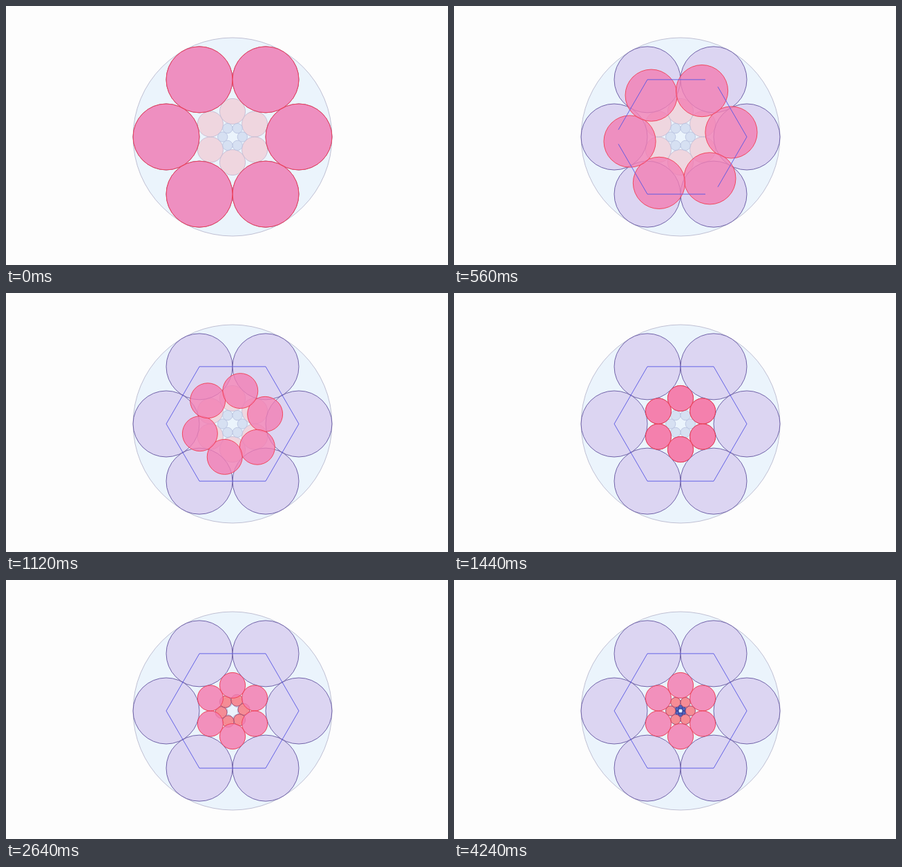
These frames come from a looping animation (640 px wide and 376 px high, 4800 ms). An HTML page with a canvas:

```html
<!DOCTYPE html>
<html lang="en">
<head>
<meta charset="utf-8">
<title>Nested rings of circles</title>
<style>
html, body { margin: 0; height: 100%; overflow: hidden; background: #fdfdfd; }
canvas { display: block; }
</style>
</head>
<body>
<canvas id="stage" width="640" height="376"></canvas>
<script>
const ctx = document.getElementById('stage').getContext('2d');
const STEP = 80, LOOP = 4800, LAST = 53, PHASE = 17;
const CX = 328, CY = 190, DIST = 96;
// Each ring touches the one around it, turned by 30 degrees.
const SHRINK = (Math.sqrt(3) + 0.5 - Math.sqrt(1 + Math.sqrt(3))) / 1.5;

const clamp = v => Math.max(0, Math.min(1, v));
const lerp = (a, b, s) => a + (b - a) * s;

function point(level, i) {
  const angle = (i * 60 - (level % 2) * 30) * Math.PI / 180;
  const d = DIST * SHRINK ** level;
  return { x: CX + d * Math.cos(angle), y: CY + d * Math.sin(angle), r: d / 2 };
}

function circle(x, y, r, fill, stroke) {
  ctx.beginPath();
  ctx.arc(x, y, r, 0, 2 * Math.PI);
  ctx.fillStyle = fill;
  ctx.fill();
  ctx.strokeStyle = stroke;
  ctx.stroke();
}

// Six circles on straight paths from one level to the next.
function ring(level, s, fill, stroke) {
  for (let i = 0; i < 6; i++) {
    const a = point(level, i), b = point(level + 1, i);
    circle(lerp(a.x, b.x, s), lerp(a.y, b.y, s), lerp(a.r, b.r, s), fill, stroke);
  }
}

// Edges grow both ways from every second corner.
function hexagon(u) {
  if (!u) return;
  ctx.beginPath();
  for (let i = 0; i < 6; i += 2) {
    const c = point(0, i), p = point(0, i + 5), n = point(0, i + 1);
    ctx.moveTo(lerp(c.x, p.x, u), lerp(c.y, p.y, u));
    ctx.lineTo(c.x, c.y);
    ctx.lineTo(lerp(c.x, n.x, u), lerp(c.y, n.y, u));
  }
  ctx.strokeStyle = '#5656e4';
  ctx.stroke();
}

function draw(k) {
  const progress = (k - 1) / PHASE;
  ctx.fillStyle = '#fdfdfd';
  ctx.fillRect(0, 0, 640, 376);
  ctx.lineWidth = 0.9;
  circle(CX, CY, 144, '#ebf4fc', '#b9b9cf');
  ring(1, 0, '#efd6df', '#c6bcd2');
  ring(2, 0, '#d6e0f2', '#b9c3e0');
  ring(0, 0, '#dcd5f2', '#6455a0');
  if (progress >= 2) ring(2, clamp(progress - 2), '#5363bb', '#26348f');
  if (progress >= 1) ring(1, clamp(progress - 1), 'rgba(255,112,118,.75)', '#a0486e');
  ring(0, clamp(progress), 'rgba(243,127,180,.8)', '#f23c50');
  hexagon(clamp(k / 8));
}

function tick() {
  draw(Math.min(LAST, Math.floor(performance.now() % LOOP / STEP)));
  requestAnimationFrame(tick);
}
tick();
</script>
</body>
</html>
```
